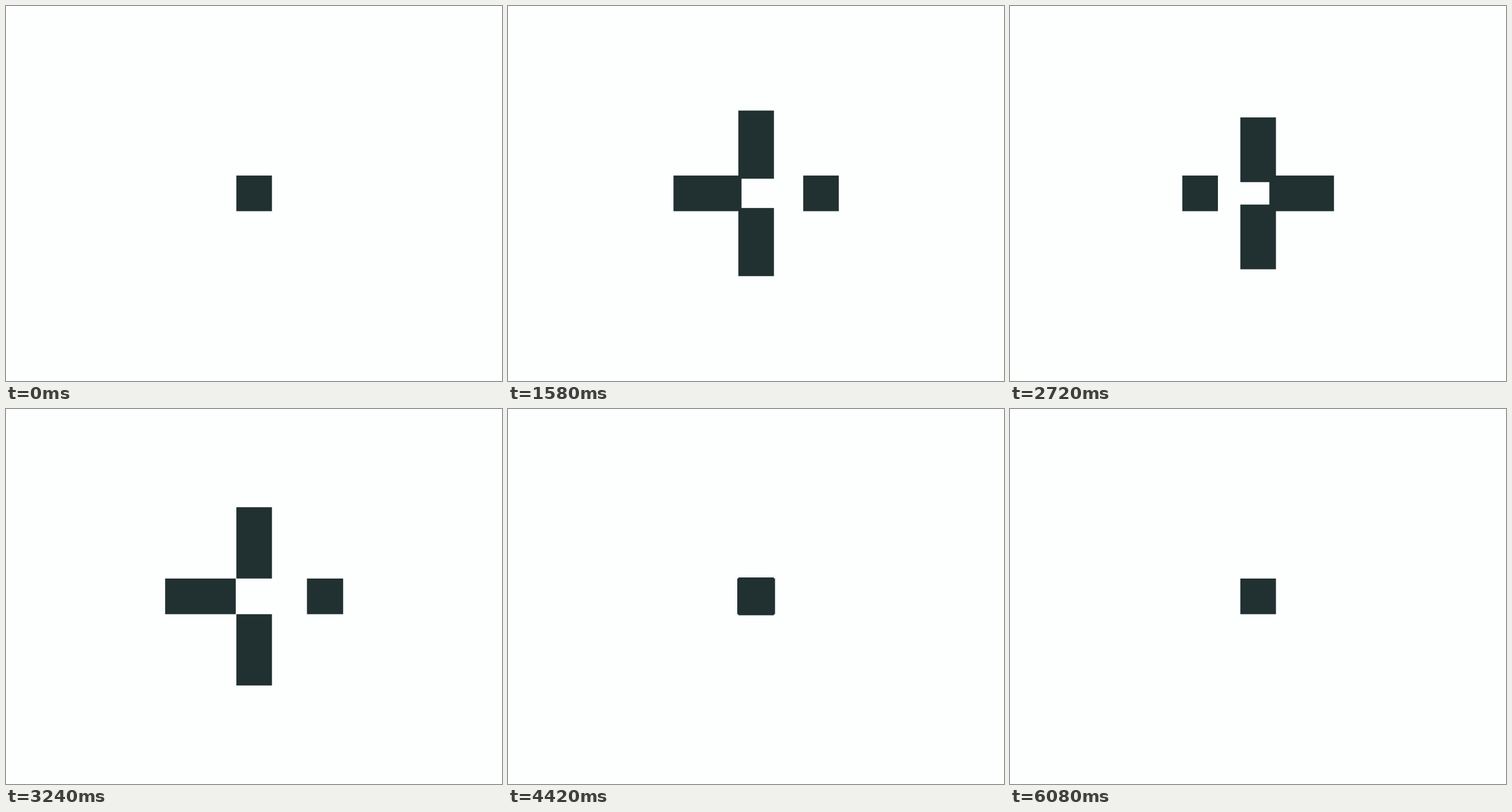
Write an HTML page with a canvas that moves like this. It is 861 px wide and 650 px high and loops after 6.2 s.

```html
<!DOCTYPE html>
<html lang="en">
<head>
<meta charset="utf-8">
<title>Unfolding square</title>
<style>
  html, body { margin: 0; width: 100%; height: 100%; overflow: hidden; background: #fdfefe; }
  canvas { display: block; }
</style>
</head>
<body>
<canvas width="861" height="650"></canvas>
<script>
const ctx = document.querySelector('canvas').getContext('2d');
const LOOP = 6200, STEP = 20, DURATION = 390;
const UNIT = 61.8, CX = 430.75, CY = 324.75;

// Start times of each cycle's three moves, in ms
const cycles = [
  { expand: 547, swap: 1035, retract: 1440 },
  { expand: 2520, swap: 2915, retract: 3335 },
  { expand: 4409, swap: 4800, retract: 5175 },
];

// cubic-bezier(.25, .1, .25, 1), solved by bisection
function ease(x) {
  if (x <= 0) return 0;
  if (x >= 1) return 1;
  let lo = 0, hi = 1;
  for (let i = 0; i < 24; i++) {
    const s = (lo + hi) / 2;
    if (0.75 * s * (1 - s) + s ** 3 < x) lo = s; else hi = s;
  }
  return 0.3 * lo * (1 - lo) ** 2 + 3 * lo * lo * (1 - lo) + lo ** 3;
}

// An arm lies along the x axis, turned by quarter turns; length is in units
function arm(quarter, spread, length) {
  const outer = 0.5 + 2 * spread;
  const inner = outer - 1 - spread * (length - 1);
  ctx.save();
  ctx.translate(CX, CY);
  ctx.rotate(quarter * Math.PI / 2);
  ctx.fillRect(inner * UNIT, -UNIT / 2, (outer - inner) * UNIT, UNIT);
  ctx.restore();
}

function draw(t) {
  const cycle = cycles.findLast(c => t >= c.expand) || cycles[0];
  const progress = start => (t - start) / DURATION;
  const spread = t < cycle.retract
    ? ease(progress(cycle.expand))
    : ease(1 - progress(cycle.retract));
  const swap = ease(progress(cycle.swap));

  ctx.fillStyle = '#fdfefe';
  ctx.fillRect(0, 0, 861, 650);
  ctx.fillStyle = '#213030';
  if (spread === 0) {
    ctx.fillRect(CX - UNIT / 2, CY - UNIT / 2, UNIT, UNIT);
    return;
  }
  [2 - swap, 2, 1 + swap, 2].forEach((length, i) => arm(i, spread, length));
}

function tick() {
  const t = performance.now() % LOOP;
  draw(Math.floor(t / STEP) * STEP);
  requestAnimationFrame(tick);
}
tick();
</script>
</body>
</html>
```
